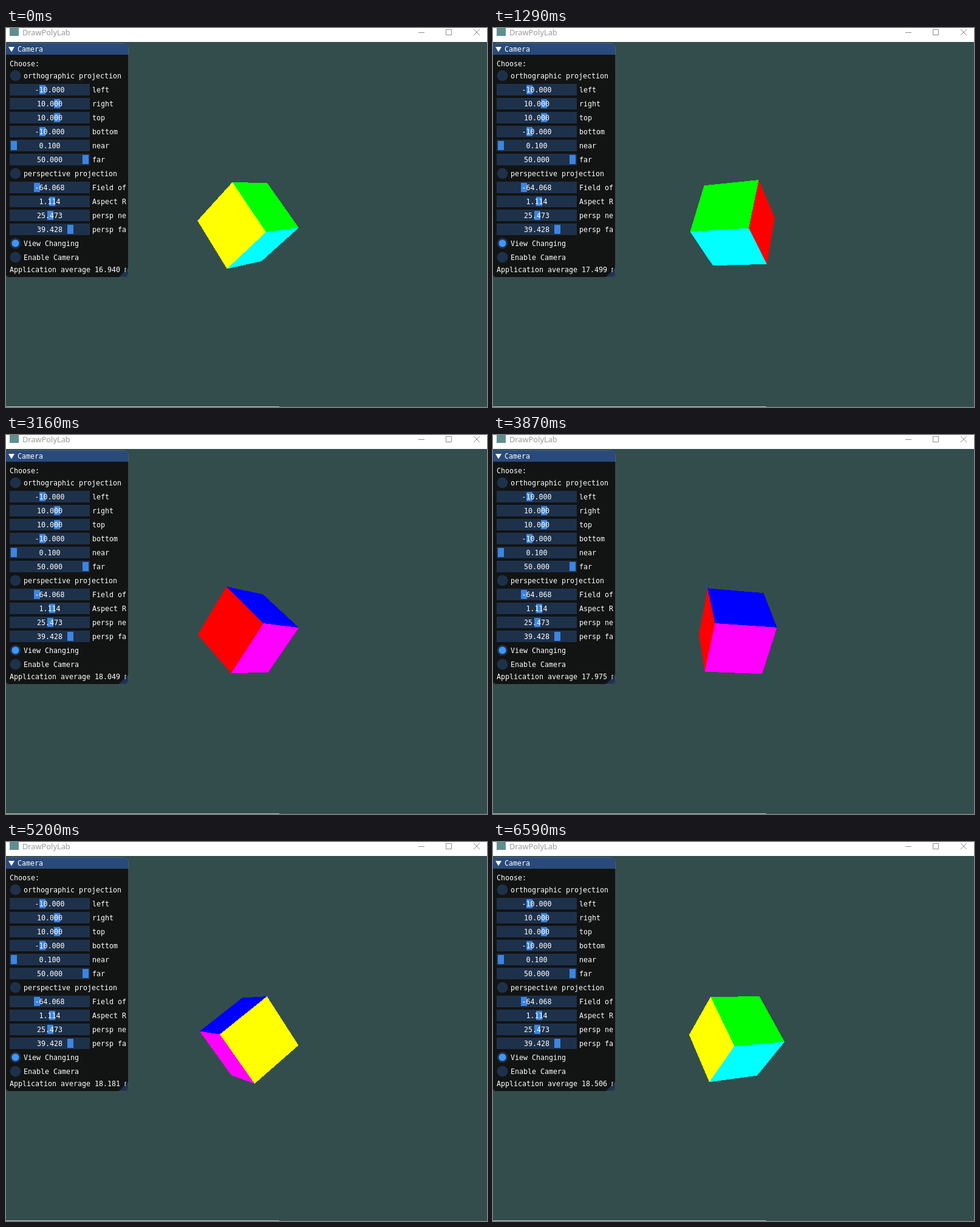
An HTML page for the animation above (6.68 s loop, 792x624 px).

```html
<!DOCTYPE html>
<html lang="en">
<head>
<meta charset="utf-8">
<title>Cube view</title>
<style>
  html, body { margin: 0; width: 100%; height: 100%; overflow: hidden; background: #334d4d; }
  svg { display: block; }
  .ui { font: 11.63px "DejaVu Sans Mono", monospace; fill: #fff; }
  .caption { font: 12.8px "Noto Sans", sans-serif; fill: #999; }
  .value { text-anchor: middle; }
</style>
</head>
<body>
<svg id="stage" width="792" height="624" viewBox="0 0 792 624">
  <defs>
    <clipPath id="window"><rect x="-1.5" y="25" width="203.5" height="386" rx="7"/></clipPath>
    <clipPath id="content"><rect x="0" y="25" width="198" height="386"/></clipPath>
  </defs>
  <rect width="792" height="624" fill="#334d4d"/>
  <g id="cube" shape-rendering="crispEdges"></g>

  <rect width="792" height="23" fill="#fff"/>
  <rect x="6" y="0" width="15" height="13" fill="#5f8f8d"/>
  <text class="caption" x="27" y="12">DrawPolyLab</text>
  <g fill="none" stroke="#8c8c8c">
    <path d="M679 7.5H689M724.5 2.5h9v9h-9z"/>
    <path d="M770 2l10 10M780 2l-10 10"/>
  </g>
  <rect y="623" width="450" height="1" fill="#c0c9c9"/>
  <rect x="450" y="623" width="342" height="1" fill="#405858"/>

  <g clip-path="url(#window)">
    <rect x="-2" y="25" width="204" height="386" fill="#121313"/>
    <rect x="-2" y="25" width="204" height="19" fill="#294a7a"/>
    <path d="M202 394V411H185Z" fill="#1e344d"/>
  </g>
  <rect x="-1" y="25.5" width="202.5" height="385" rx="7" fill="none" stroke="#6e6e80" stroke-opacity=".5"/>
  <path d="M4 31H14L9 39.5Z" fill="#fff"/>
  <g id="panel" class="ui" clip-path="url(#content)"></g>
</svg>
<script>
const LOOP = 6680;
const panel = document.getElementById('panel');
const cube = document.getElementById('cube');

function add(parent, tag, attrs, text) {
  const el = document.createElementNS('http://www.w3.org/2000/svg', tag);
  for (const key in attrs) el.setAttribute(key, attrs[key]);
  if (text) el.textContent = text;
  parent.appendChild(el);
  return el;
}

// ---- control panel ----
const label = (x, y, text) => add(panel, 'text', { x, y }, text);

function radio(y, text, on) {
  add(panel, 'circle', { cx: 15.5, cy: y - 0.5, r: 9, fill: '#1e314b' });
  if (on) add(panel, 'circle', { cx: 15.5, cy: y - 0.5, r: 6, fill: '#4296fa' });
  label(29, y + 4, text);
}

function slider(y, value, grab, text) {
  add(panel, 'rect', { x: 6, y: y - 10, width: 132, height: 19, fill: '#1e314b' });
  add(panel, 'rect', { x: grab - 5, y: y - 8, width: 10, height: 15, fill: '#3d85e0' });
  add(panel, 'text', { x: 72, y: y + 4, class: 'value' }, value);
  label(142, y + 4, text);
}

label(19, 39, 'Camera');
label(6, 63, 'Choose:');
radio(79, 'orthographic projection');
[
  ['-10.000', 60, 'left'],
  ['10.000', 84, 'right'],
  ['10.000', 84, 'top'],
  ['-10.000', 60, 'bottom'],
  ['0.100', 13, 'near'],
  ['50.000', 131, 'far']
].forEach((row, i) => slider(102 + 23 * i, ...row));
radio(240, 'perspective projection');
[
  ['-64.068', 51, 'Field of View'],
  ['1.114', 76, 'Aspect Ratio'],
  ['25.473', 73, 'persp near'],
  ['39.428', 106, 'persp far']
].forEach((row, i) => slider(263 + 23 * i, ...row));
radio(355, 'View Changing', true);
radio(378, 'Enable Camera');
const stats = label(6, 402, ' ');

// ---- picture times: first, last, count ----
const FIRST = -26; // the opening picture was taken just before the loop starts
const times = [FIRST];
[
  [70, 670, 9], [750, 1370, 9], [1450, 2070, 9], [2160, 2770, 9],
  [2850, 3160, 5], [3240, 3480, 4], [3560, 4190, 9], [4270, 4650, 6],
  [4730, 4890, 3], [4970, 5590, 9], [5670, 6280, 9], [6370, 6590, 4]
].forEach(([first, last, count]) => {
  for (let i = 0; i < count; i++) {
    times.push(Math.round((first + (last - first) * i / (count - 1)) / 10) * 10);
  }
});

// ---- average frame time ----
const averages = [
  [FIRST, 16.940], [1290, 17.499], [2240, 18.420], [3160, 18.049], [3500, 18.02],
  [4100, 17.93], [4650, 18.021], [5670, 18.317], [6590, 18.506]
];

function averageAt(t) {
  let i = 1;
  while (i < averages.length - 1 && t > averages[i][0]) i++;
  const [t0, a] = averages[i - 1], [t1, b] = averages[i];
  return a + (b - a) * (t - t0) / (t1 - t0);
}

// ---- cube: half edge 1, y down, z towards the camera ----
const DIST = 15, FOCAL = 724, CX = 398.5, CY = 323;
const TILT = 0.06, ROLL = 0.913, START_ANGLE = 5.622;
const ct = Math.cos(TILT), st = Math.sin(TILT);
const cr = Math.cos(ROLL), sr = Math.sin(ROLL);
const axes = [
  [0, st, ct],
  [cr, sr * ct, -sr * st],
  [sr, -cr * ct, cr * st]
];
const faces = [
  [0, 1, '#ff0'], [0, -1, '#f00'],
  [1, 1, '#0ff'], [1, -1, '#00f'],
  [2, 1, '#0f0'], [2, -1, '#f0f']
].map(([axis, sign, fill]) => ({ axis, sign, el: add(cube, 'polygon', { fill }) }));
const corners = [[-1, -1], [1, -1], [1, 1], [-1, 1]];

function drawCube(angle) {
  const c = Math.cos(angle), s = Math.sin(angle);
  const turned = axes.map(([x, y, z]) => [x * c + z * s, y, z * c - x * s]);
  for (const { axis, sign, el } of faces) {
    const n = turned[axis], u = turned[(axis + 1) % 3], v = turned[(axis + 2) % 3];
    const visible = sign * n[2] * DIST > 1;
    el.setAttribute('visibility', visible ? 'visible' : 'hidden');
    if (!visible) continue;
    el.setAttribute('points', corners.map(([a, b]) => {
      const [x, y, z] = n.map((k, i) => k * sign + u[i] * a + v[i] * b);
      const scale = FOCAL / (DIST - z);
      return (CX + x * scale).toFixed(2) + ',' + (CY + y * scale).toFixed(2);
    }).join(' '));
  }
}

// ---- playback ----
let shown = -1;

function draw(ms) {
  let i = times.length - 1;
  while (times[i] > ms) i--;
  if (i === shown) return;
  shown = i;
  const t = times[i];
  drawCube(START_ANGLE - t / 1000);
  stats.textContent = 'Application average ' + averageAt(t).toFixed(3) + ' ms/frame';
}

const start = performance.now();
function tick() {
  draw((performance.now() - start) % LOOP);
  requestAnimationFrame(tick);
}
tick();
</script>
</body>
</html>
```
